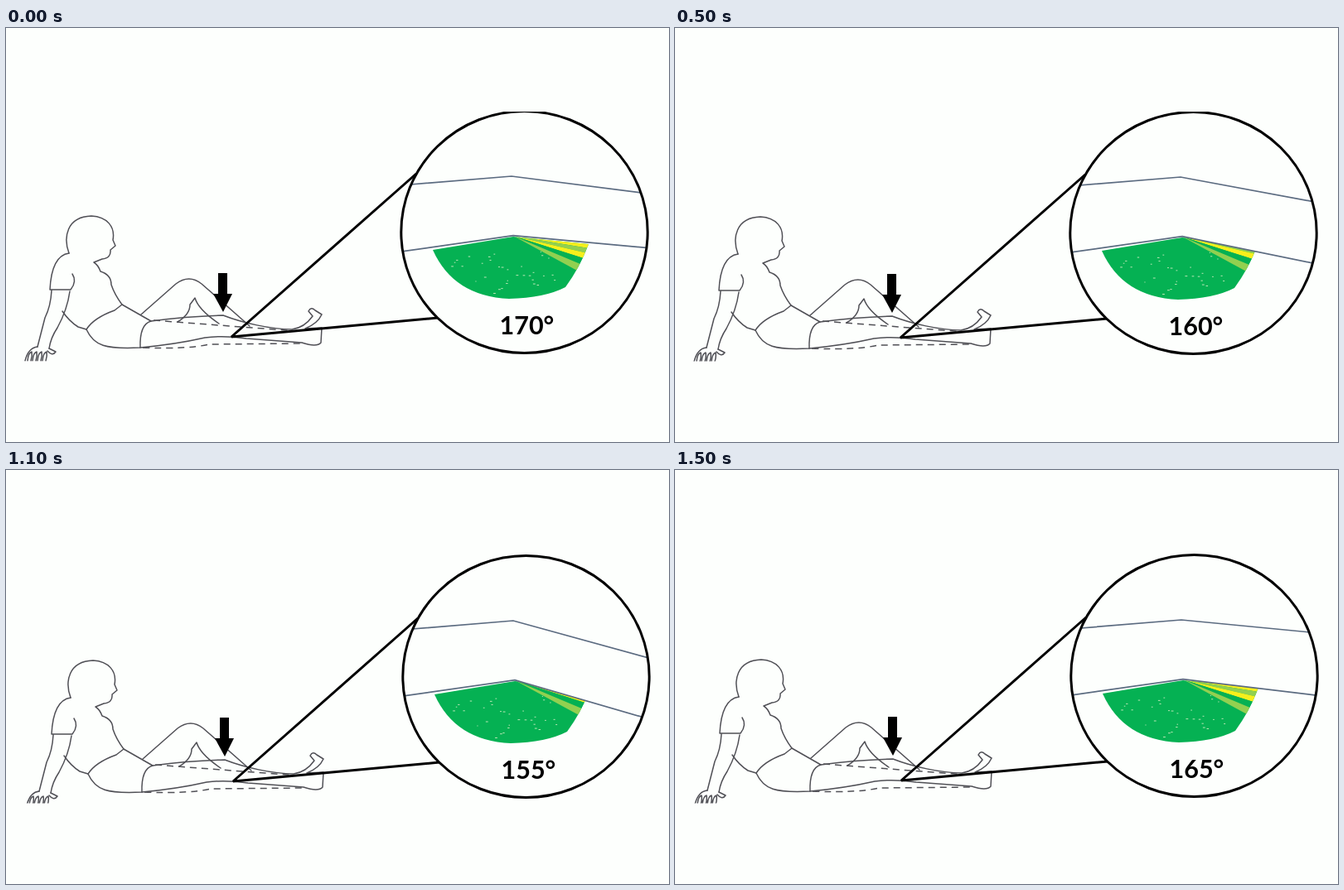
Animation, 800 px wide and 500 px high, one loop 1700 ms. Source, as an HTML page:

```html
<!DOCTYPE html>
<html lang="en">
<head>
<meta charset="utf-8">
<title>Knee extension angle</title>
<style>
  html, body { margin: 0; width: 100%; height: 100%; overflow: hidden; background: #fdfffd; }
  svg { display: block; width: 800px; height: 500px; }
  .body { fill: none; stroke: #505056; stroke-width: 1.5; stroke-linecap: round; stroke-linejoin: round; }
  .dash { stroke-dasharray: 8 6; stroke-linecap: butt; }
  .bone { fill: none; stroke: #5b6b80; stroke-width: 1.7; }
  .zoom { fill: none; stroke: #000; stroke-width: 3; stroke-linejoin: bevel; }
  text { font: 700 30.5px Lato, Carlito, sans-serif; }
</style>
</head>
<body>
<svg viewBox="0 0 800 500">
  <defs>
    <clipPath id="window"><rect y="101" width="800" height="301.5"/></clipPath>
    <clipPath id="lens"><ellipse cx="625.5" cy="246.5" rx="149" ry="146"/></clipPath>
    <clipPath id="below"><path id="cut"/></clipPath>
    <clipPath id="sector"><path d="M612 252L515 268Q540 324 607 327Q650 326 675 313Q692 290 703 261Z"/></clipPath>
  </defs>
  <g clip-path="url(#window)">
  <g id="scene">
    <g class="body">
      <!-- head and chest -->
      <path d="M76 272C69 253 73 228 103 227C122 228 132 240 129 256L132 263L126 268Q127 278 116 279L106 283Q111 286 114 294Q127 298 127 310Q131 322 140 334"/>
      <!-- arm and back -->
      <path d="M76 272Q55 275 53 316H78Q86 306 80 297M55 317Q54 336 47 350L38 385M77 318Q74 340 62 362Q54 374 52 387M68 342Q76 354 87 361L97 364"/>
      <!-- hand -->
      <path d="M38 385Q27 386 23 402M52 387L60 391Q56 397 50 390"/>
      <path id="fingers"/>
      <!-- shorts -->
      <path d="M97 364Q106 350 131 341L140 334L175 354Q161 358 162 386C120 388 106 384 97 364"/>
      <!-- bent leg -->
      <path d="M163 346L205 309Q221 297 236 309L294 360M207 355Q222 346 222 334L228 326Q232 340 257 357"/>
      <!-- straight leg and foot -->
      <path d="M175 354Q220 348 262 347C285 356 320 364 345 364Q360 362 370 348L365 342Q368 336 373 341L381 346Q376 357 361 363L381 362L380 380Q375 386 357 380M162 386Q205 382 240 374Q262 371 290 375L357 380"/>
      <path class="dash" d="M178 353L350 366M165 386Q220 388 245 382L355 381"/>
    </g>
    <path d="M256 296h11v25h6l-11 22l-12-22h6z"/>
    <path class="zoom" d="M495 176L272 373L521 350"/>
    <g clip-path="url(#below)"><g id="fan" clip-path="url(#sector)"></g></g>
    <path class="bone" id="bones" clip-path="url(#lens)"/>
    <ellipse class="zoom" cx="625.5" cy="246.5" rx="148.7" ry="146"/>
    <text id="label" x="595.5" y="370"></text>
  </g>
  </g>
</svg>
<script>
const $ = id => document.getElementById(id);
const green = '#05b153', lime = '#92d050', yellow = '#f7ef1c';

// Point 200 px from the knee, at a number of degrees below the horizontal
function ray(x, y, degrees) {
  const a = degrees * Math.PI / 180;
  return `${x + 200 * Math.cos(a)} ${y + 200 * Math.sin(a)}`;
}

$('fingers').setAttribute('d', [0, 1, 2, 3].map(i => `M${26 + 6 * i} 402q1-10 5-11q1 5-1 11`).join(''));

let seed = 7;
const random = () => (seed = seed * 16807 % 2147483647) / 2147483647;

// Green sector with pale flecks, then stripes that widen downwards
let fan = `<rect x="500" y="240" width="220" height="100" fill="${green}"/>`;
for (let i = 0; i < 36; i++) {
  const a = random() * Math.PI, r = Math.sqrt(random());
  const x = 606 + Math.cos(a) * r * 78, y = 269 + Math.sin(a) * r * 55;
  fan += `<rect x="${x}" y="${y}" width="${1 + random() * 2}" height="1" fill="#b9e6b4"/>`;
}
const edge = k => ray(612, 251, 6 + 3 * k + 0.3 * k * k);
[yellow, lime, yellow, green, lime].forEach((fill, k) => {
  fan += `<path fill="${fill}" d="M612 251L${edge(k)}L${edge(k + 1)}Z"/>`;
});
$('fan').innerHTML = fan;

// Knee angle, scene shift, slopes of the upper and lower shin lines in degrees
const poses = [
  { angle: 170, shift: [0, 0], upper: 7.3, lower: 5.2 },
  { angle: 165, shift: [1, 2], upper: 5.5, lower: 6.9 },
  { angle: 160, shift: [0, 1], upper: 10.5, lower: 11.6 },
  { angle: 155, shift: [2, 3], upper: 15.4, lower: 16.2 },
  { angle: 150, shift: [1, 1], upper: 18, lower: 20.6 }
];

let shown;
function show(pose) {
  if (pose === shown) return;
  shown = pose;
  const top = ray(610, 179, pose.upper), bottom = ray(612, 250.7, pose.lower);
  $('scene').setAttribute('transform', `translate(${pose.shift})`);
  $('bones').setAttribute('d', `M470 190.5L610 179L${top}M470 271L612 250.7L${bottom}`);
  $('cut').setAttribute('d', `M470 240L612 250.7L${bottom}V400H470Z`);
  $('label').textContent = pose.angle + '°';
}

// Bend step by step to the last pose, then back again
function tick(now) {
  const t = Math.max(0, now - start) % 1700;
  const step = t < 300 ? 0 : 1 + Math.floor((t - 300) / 200);
  show(poses[4 - Math.abs(4 - step)]);
  requestAnimationFrame(tick);
}
const start = performance.now();
tick(start);
</script>
</body>
</html>
```
